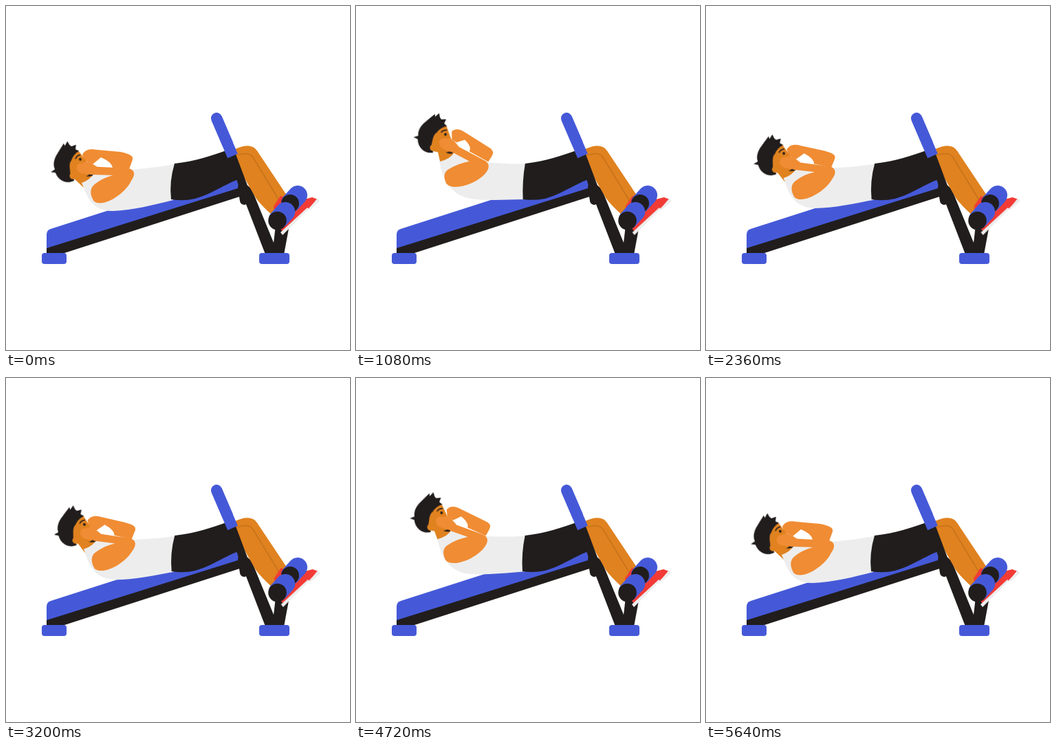
Animation, 500 px wide and 500 px high, one loop 6000 ms. Source, as an HTML page:

```html
<!DOCTYPE html>
<html lang="en">
<head>
<meta charset="utf-8">
<title>Incline sit-up</title>
<style>
  html, body { margin: 0; height: 100%; overflow: hidden; background: #fff; }
  svg { display: block; width: 100vw; height: 100vh; }

  .blue { fill: #4559d8; }
  .dark { fill: #211d1d; }
  .skin { fill: #f08c33; }
  .shade { fill: #e0821f; }
  .shirt { fill: #ededed; }
  .red { fill: #f23b36; }

  /* two repetitions, then a short rest */
  .morph, .head, .shoes { animation: 6s cubic-bezier(.333, 0, .667, 1) infinite; }
  .morph { animation-name: morph; }
  .head { animation-name: nod; transform-origin: 113px 203px; }
  .shoes { animation-name: press; }

  @keyframes morph {
    0%, 46%, 92.67%, 100% { d: var(--down); }
    23%, 69.33% { d: var(--up); }
  }
  @keyframes nod {
    0%, 46%, 92.67%, 100% { transform: translate(-16px, 44px) rotate(-20deg); }
    23%, 69.33% { transform: translate(1px, -2.6px) rotate(1.3deg); }
  }
  @keyframes press {
    0%, 46%, 92.67%, 100% { transform: translate(-3px, 0); }
    23%, 69.33% { transform: none; }
  }

  .far-arm {
    --down: path("M111 216 C116 207 126 208 132 209 L166 212 C184 216 186 219 183 226 L179 237 L155 235 Q153 226 138 220 L126 230 L114 224 Z");
    --up: path("M143 178 C148 173 155 175 160 179 L196 204 C203 209 202 213 199 218 L194 225 L166 208 Q171 202 161 191 L149 194 L143 190 Z");
  }
  .neck {
    --down: path("M98 250 L124 238 L130 247 L113 264 Z");
    --up: path("M121 203 L144 203 L147 214 L125 228 Z");
  }
  .torso {
    --down: path("M248 229 C225 234 205 236 180 238 L128 243 Q122 253 110 257 C117 272 121 298 155 298 C185 297 215 289 243 282 Z");
    --up: path("M248 229 C228 230 210 227 190 226 L145 208 Q140 218 123 222 C125 239 134 272 171 278 C190 281 215 281 247 281 Z");
  }
  .shorts {
    --down: path("M245 229 C275 226 300 217 320 210 L334 219 L345 249 C315 260 300 273 275 280 Q258 284 240 281 Q237 255 245 229 Z");
    --up: path("M246 229 C275 226 300 217 320 210 L334 219 L345 249 C315 260 300 273 275 280 Q258 283 243 281 Q242 255 246 229 Z");
  }
  .near-arm {
    --down: path("M128 284 C122 275 121 265 129 259 C138 252 147 248 156 246 L122 245 L119 233 L178 236 C188 238 188 246 182 254 C174 272 142 294 128 284 Z");
    --up: path("M132 255 C128 247 128 239 134 235 C144 229 155 225 166 223 L144 209 L150 199 L188 223 C197 228 194 237 188 243 C174 257 142 266 132 255 Z");
  }
</style>
</head>
<body>
<svg viewBox="0 0 500 500">
  <!-- bench -->
  <path class="dark" d="M59 350 L340 261 L346 275 L85 359 L59 361 Z"/>
  <path class="blue" d="M59 352 V332 Q59 326 65 324 L330 239 L340 264 Z"/>
  <path class="dark" d="M336 240 L348 258 L357 266 L389 344 L392 318 H412 L404 361 H377 L345 278 L338 266 Z"/>
  <rect class="blue" x="52" y="359" width="36" height="16" rx="4"/>
  <rect class="blue" x="368" y="359" width="44" height="16" rx="4"/>

  <!-- legs -->
  <path class="shade" d="M333 208 Q352 199 362 207 Q365 210 368 215 L408 275 L400 292 L387 304 Q372 291 363 279 L346 249 L334 220 Z"/>
  <path d="M336 217 Q353 211 359 220 L398 284" fill="none" stroke="#c9741c" stroke-width="1.8"/>

  <g class="shoes">
    <path class="red" d="M392 291 L402 276 L425 284 L448 278 L456 281 L441 296 L405 328 L396 316 Z"/>
    <path class="shirt" d="M402 329 L441 293 L443 295 L456 279 L459 284 L445 296 L442 296 L405 333 Z"/>
  </g>

  <!-- foot rollers -->
  <path d="M424 275 L414 286 M406 299 L396 310" stroke="#4559d8" stroke-width="28" stroke-linecap="round"/>
  <circle class="dark" cx="413" cy="287" r="13"/>
  <circle class="blue" cx="406" cy="299" r="14"/>
  <circle class="dark" cx="394.500" cy="312" r="13.300"/>

  <!-- athlete -->
  <path class="morph far-arm skin"/>
  <path class="morph neck shade"/>
  <path class="morph torso shirt"/>
  <path class="morph shorts dark"/>

  <g class="head">
    <path class="shade" d="M110 192 Q120 174 133 171 L136 180 L141 195 Q145 204 141 209 Q130 213 113 208 Z"/>
    <path class="dark" d="M131 210 Q138 210 144 205 L141 212 Q136 213 131 210 Z"/>
    <path class="dark" d="M85 187 L92 185 C91 178 96 170 103 165 Q109 160 117 154 L117 158 L123 153 L124 159 L126 162 L133 162 L130 168 L134 172 Q124 174 119 181 Q115 183 113 190 L111 198 L113 210 C101 212 91 203 91 190 Z"/>
    <circle class="shade" cx="113.500" cy="203" r="5"/>
    <path d="M125 181 Q129 177 134 178" fill="none" stroke="#211d1d" stroke-width="1.600"/>
    <circle class="dark" cx="131.500" cy="184" r="1.900"/>
    <path class="skin" d="M122 195 Q125 187 132 190 Q140 189 145 195 L151 203 L144 211 Q135 209 130 206 Q122 203 122 195 Z"/>
  </g>

  <path class="morph near-arm skin"/>

  <!-- handle -->
  <path d="M327 214 L345 262" stroke="#211d1d" stroke-width="12"/>
  <path d="M343 264 L346 283" stroke="#211d1d" stroke-width="12" stroke-linecap="round"/>
  <path d="M306 163 L322 200" stroke="#4559d8" stroke-width="16" stroke-linecap="round"/>
  <path d="M306 163 L329.500 218" stroke="#4559d8" stroke-width="16"/>
</svg>
</body>
</html>
```
